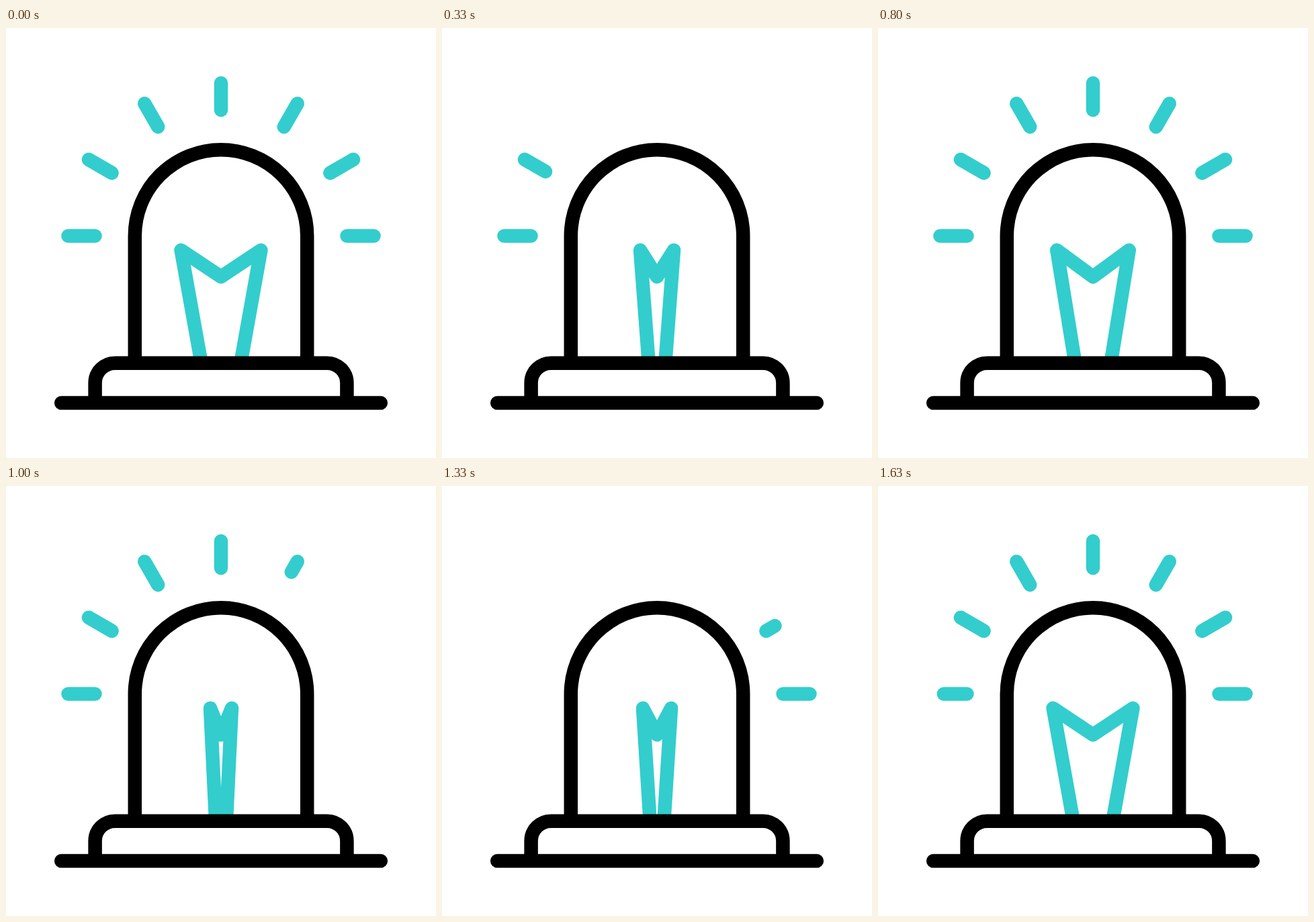
An HTML page for the animation above (1670 ms loop, 640x640 px).

```html
<!DOCTYPE html>
<html lang="en">
<head>
<meta charset="utf-8">
<title>Siren light</title>
<style>
  html, body { margin: 0; width: 100%; height: 100%; overflow: hidden; background: #fff; }
  svg { display: block; width: 100%; height: 100%; }
  path, line { fill: none; stroke: #000; stroke-width: 20.5; stroke-linejoin: round; }
  #bulb, #rays line { stroke: #33cdcd; }
  #rays line, #floor { stroke-linecap: round; }
</style>
</head>
<body>
<svg viewBox="0 0 640 640">
  <g id="rays"></g>
  <path id="bulb"/>
  <path d="M191.8 499V309.5a128.2 128.2 0 0 1 256.4 0V499"/>
  <path d="M132.6 558V528.3a29.6 29.6 0 0 1 29.6-29.6H477.8a29.6 29.6 0 0 1 29.6 29.6V558"/>
  <path id="floor" d="M82.2 558H557.8"/>
</svg>
<script>
const LOOP = 1670, FRAME = 100 / 3, FRAMES = 50;
const RAYS = 7, INNER = 187.5, LENGTH = 40;
const bulb = document.getElementById('bulb');
const clamp = x => Math.min(1, Math.max(0, x));

// Rays run from the right (0) over the top to the left (6).
const rays = Array.from({ length: RAYS }, (_, i) => {
  const line = document.createElementNS('http://www.w3.org/2000/svg', 'line');
  line.setAttribute('transform', `translate(320 309.5) rotate(${-30 * i})`);
  return document.getElementById('rays').appendChild(line);
});

// Times in frames: when rays start to vanish and to grow, and the steps per ray.
const sweeps = [
  { vanish: 0, vanishStep: 1.96, grow: 12.25, growStep: 1.4 },
  { vanish: 25, vanishStep: 1.96, grow: 37.74, growStep: 1.64 }
];

// The bulb alternates between open (even keys) and closed (odd keys).
const bulbKeys = [3.06, 15.66, 21.35, 34.6, 47.9];

function bulbOpening(frame) {
  const last = bulbKeys.length - 1;
  if (frame <= bulbKeys[0] || frame >= bulbKeys[last]) return 1;
  const k = bulbKeys.findIndex(key => key > frame) - 1;
  const u = (frame - bulbKeys[k]) / (bulbKeys[k + 1] - bulbKeys[k]);
  return (1 + Math.cos(Math.PI * (k + u))) / 2;
}

function drawRay(line, i, frame) {
  const s = sweeps[frame < 25 ? 0 : 1];
  const gone = clamp((frame - s.vanish) / s.vanishStep - i);
  const grown = clamp((frame - s.grow) / s.growStep - i);
  const [from, to] = grown > 0 ? [0, grown] : [gone, 1];
  line.style.display = from < to ? '' : 'none';
  line.setAttribute('x1', INNER + LENGTH * from);
  line.setAttribute('x2', INNER + LENGTH * to);
}

function draw(now) {
  const frame = Math.min(FRAMES - 1, Math.floor((now % LOOP + 4) / FRAME));
  const top = 59.4 * bulbOpening(frame), foot = top * 0.492;
  bulb.setAttribute('d',
    `M${320 - foot} 499L${320 - top} 330.7L320 370.2L${320 + top} 330.7L${320 + foot} 499`);
  rays.forEach((line, i) => drawRay(line, i, frame));
}

let start;
function tick(now) {
  start ??= now;
  draw(now - start);
  requestAnimationFrame(tick);
}
draw(0);
requestAnimationFrame(tick);
</script>
</body>
</html>
```
